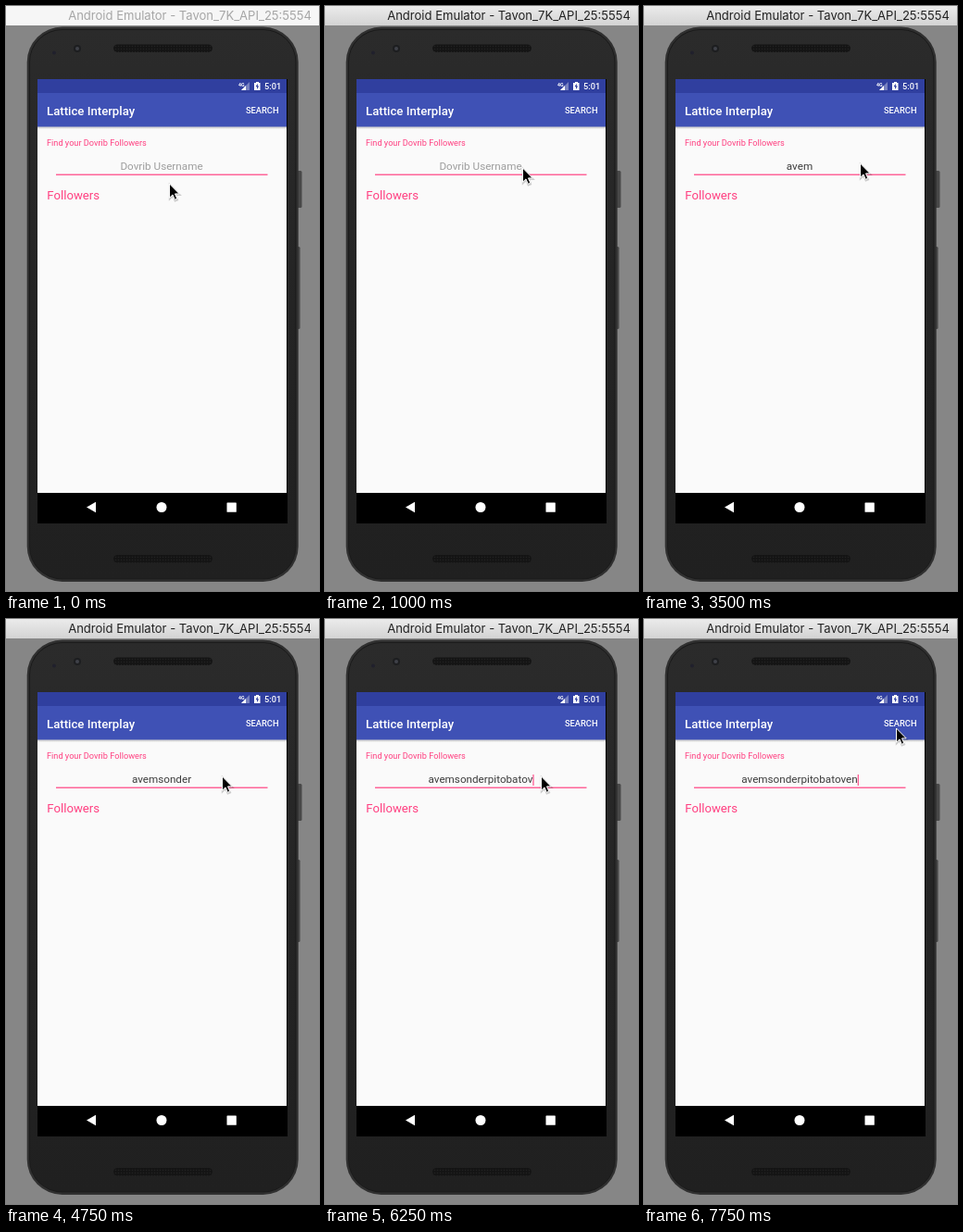
Write an HTML page that moves like this. It is 338x632 px and loops after 8000 ms.

```html
<!DOCTYPE html>
<html lang="en">
<head>
<meta charset="utf-8">
<title>Follower search</title>
<style>
  html, body { margin: 0; width: 100%; height: 100%; overflow: hidden; background: #868686; }
  svg { display: block; width: 338px; height: 632px; font-family: Roboto, sans-serif; }
  .medium { font-weight: 500; fill: #fff; }
  .pink { fill: #ff4081; }
</style>
</head>
<body>
<svg viewBox="0 0 338 632" xmlns="http://www.w3.org/2000/svg">
  <defs>
    <linearGradient id="bar" x2="0" y2="1">
      <stop stop-color="#ebebeb"/><stop offset="1" stop-color="#d3d3d3"/>
    </linearGradient>
    <linearGradient id="body" x2="0" y2="1">
      <stop stop-color="#2b2b2b"/><stop offset=".5" stop-color="#242424"/><stop offset="1" stop-color="#202020"/>
    </linearGradient>
    <linearGradient id="shade" x2="0" y2="1">
      <stop stop-color="#000" stop-opacity=".2"/><stop offset="1" stop-color="#000" stop-opacity="0"/>
    </linearGradient>
    <pattern id="mesh" width="3" height="3" patternUnits="userSpaceOnUse">
      <rect width="3" height="3" fill="#141414"/>
      <circle cx="1.5" cy="1.5" r=".7" fill="#222"/>
    </pattern>
  </defs>

  <rect width="338" height="632" fill="#868686"/>

  <!-- window title -->
  <rect id="titleBar" width="338" height="21"/>
  <text id="title" x="330" y="15" text-anchor="end" font-family="Inter, sans-serif" font-size="13.05">Android Emulator - Tavon_7K_API_25:5554</text>

  <!-- handset -->
  <rect x="314" y="178" width="5.5" height="40" rx="1.5" fill="#484848"/>
  <rect x="314" y="260" width="3.6" height="89" rx="1.5" fill="#484848"/>
  <rect x="22.7" y="22.5" width="293" height="599.5" rx="38" fill="#303030"/>
  <rect x="25" y="25" width="288.4" height="594.5" rx="35.5" fill="#1a1a1a"/>
  <rect x="26" y="26" width="286.4" height="592.5" rx="34.5" fill="url(#body)"/>
  <rect x="116" y="41.5" width="107" height="8.5" rx="4.2" fill="url(#mesh)"/>
  <rect x="116" y="593" width="107" height="8.5" rx="4.2" fill="url(#mesh)"/>
  <circle cx="77" cy="46" r="4" fill="#1d1e20"/>
  <circle cx="77" cy="46" r="2" fill="#3f4148"/>
  <circle cx="52" cy="50.5" r="2" fill="#20202c"/>

  <!-- screen -->
  <rect x="34" y="79" width="270" height="480"/>
  <rect x="34" y="130" width="269" height="396" fill="#fafafa"/>
  <rect x="34" y="79" width="269" height="15" fill="#303f9f"/>
  <rect x="34" y="94" width="269" height="36.5" fill="#3f51b5"/>
  <rect x="34" y="130.5" width="269" height="3" fill="url(#shade)"/>

  <g fill="#fff">
    <text x="251" y="86.5" font-size="5.2" font-weight="700">4G</text>
    <path d="M254 91L263 82V91Z" opacity=".35"/>
    <path d="M254 91L259 86V91Z"/>
    <path d="M268 83H270V82H273V83H274.5V91H268Z"/>
    <path d="M271.8 83.8L269.5 87.3H271V90L273.2 86.4H271.8Z" fill="#303f9f"/>
  </g>
  <text class="medium" x="279" y="90" font-size="9.2">5:01</text>
  <text class="medium" x="44" y="118" font-size="13.2">Lattice Interplay</text>
  <text class="medium" x="259" y="116" font-size="9.3">SEARCH</text>

  <text class="pink" x="44" y="151" font-size="9.2">Find your Dovrib Followers</text>
  <text id="field" x="168" y="177" font-size="11.7" text-anchor="middle"></text>
  <rect id="caret" class="pink" y="168" width="1.1" height="12"/>
  <rect class="pink" x="54" y="181.6" width="228.5" height="1.2"/>
  <text class="pink" x="44.3" y="209.3" font-size="13.2">Followers</text>

  <g fill="#fff">
    <path d="M87 541.5L97 535.8V547.2Z"/>
    <circle cx="168" cy="541.5" r="5.5"/>
    <rect x="238.5" y="536.5" width="10.3" height="10.3" rx=".6"/>
  </g>

  <g id="pointer">
    <path d="M.5 .5V15.7L4 12.4L6.3 17.8L8.8 16.7L6.5 11.4H11.2Z" transform="translate(.3 1.2)" stroke="#000" stroke-width="2" opacity=".18"/>
    <path d="M.5 .5V15.7L4 12.4L6.3 17.8L8.8 16.7L6.5 11.4H11.2Z" stroke="#fff"/>
  </g>
</svg>
<script>
  const LOOP = 8000;
  const TICK = 250;
  const BLINK = 500;
  const CENTER = 168;
  const HINT = "Dovrib Username";

  // The name is typed in three even bursts.
  const bursts = [
    { text: "avem", from: 2000, to: 3000 },
    { text: "sonder", from: 3500, to: 4250 },
    { text: "pitobatoven", from: 4750, to: 6500 }
  ];

  const home = { x: 176, y: 191.5 };
  const moves = [
    { from: 0, to: 500, x: 213, y: 174.5 },
    { from: 1000, to: 1500, x: 233, y: 169.5 },
    { from: 6750, to: 7000, x: 245, y: 174.5 },
    { from: 7000, to: 7750, x: 272, y: 117.5 }
  ];

  const get = id => document.getElementById(id);
  const [titleBar, title, field, caret, pointer] =
    ["titleBar", "title", "field", "caret", "pointer"].map(get);

  const progress = (t, { from, to }) => Math.min(1, Math.max(0, (t - from) / (to - from)));
  const easeOut = p => 1 - (1 - p) ** 2;

  function typedText(t) {
    return bursts.map(b => b.text.slice(0, Math.floor(b.text.length * progress(t, b)))).join("");
  }

  // The caret stays lit while typing, then blinks from the last key on.
  function caretLit(t) {
    if (bursts.some(b => t > b.from && t < b.to)) return true;
    const lastKey = Math.max(-BLINK, ...bursts.filter(b => b.to <= t).map(b => b.to));
    return Math.floor((t - lastKey) / BLINK) % 2 === 0;
  }

  function pointerAt(t) {
    return moves.reduce((at, move) => {
      const p = easeOut(progress(t, move));
      return { x: at.x + (move.x - at.x) * p, y: at.y + (move.y - at.y) * p };
    }, home);
  }

  function draw(time) {
    const t = Math.floor((time % LOOP) / TICK) * TICK;
    const active = t >= 1000;
    titleBar.setAttribute("fill", active ? "url(#bar)" : "#f6f6f6");
    title.setAttribute("fill", active ? "#222" : "#a6a6a6");

    const typed = typedText(t);
    field.textContent = typed || HINT;
    field.setAttribute("fill", typed ? "#3c3c3c" : "#9e9e9e");

    const half = typed ? field.getComputedTextLength() / 2 : 0;
    caret.setAttribute("x", CENTER + half);
    caret.setAttribute("visibility", caretLit(t) ? "visible" : "hidden");

    const { x, y } = pointerAt(t);
    pointer.setAttribute("transform", `translate(${x} ${y})`);
  }

  const start = performance.now();
  function loop() {
    draw(performance.now() - start);
    requestAnimationFrame(loop);
  }
  loop();
</script>
</body>
</html>
```
